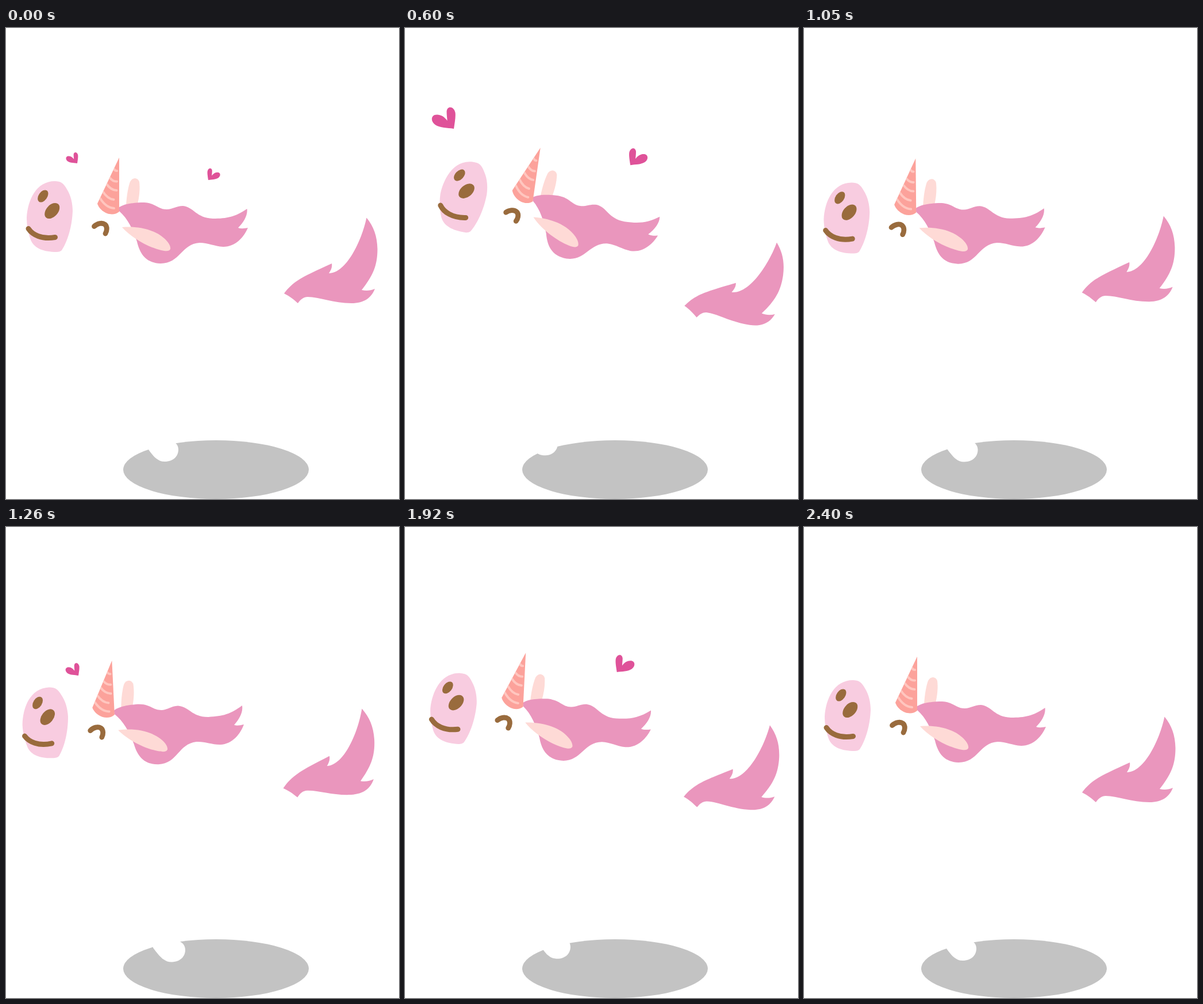
Animation of 684 by 818 pixels, one loop 2.73 s. Source, as an HTML page:

```html
<!DOCTYPE html>
<html lang="en">
<head>
<meta charset="utf-8">
<title>Rocking unicorn</title>
<style>
  html, body { margin: 0; width: 100%; height: 100%; overflow: hidden; background: #fff; }
  svg { display: block; width: 684px; height: 818px; }
  .mane { fill: #ea96bd; }
  .ear { fill: #fedad6; }
  .brown { fill: #996b3d; }
  .line { fill: none; stroke: #996b3d; stroke-linecap: round; stroke-linejoin: round; }
  .heart { fill: #df5299; }
</style>
</head>
<body>
<svg viewBox="0 0 684 818">
  <defs>
    <path id="horn" d="M197 225L197 319C191 324 183 324.500 176 322C168 319 161 312 159 305Z"/>
    <clipPath id="hornClip"><use href="#horn"/></clipPath>
  </defs>

  <ellipse cx="365.500" cy="767" rx="161.500" ry="51" fill="#c3c3c3"/>

  <g id="body">
    <path id="hoof" fill="#fff" d="M238 700L244.500 727C248 732 256 744 262 748C266 751 270 753 276 753C292 753 300 743 300 732C300 726 297 721 290 717L280 700Z"/>

    <path id="tail" class="mane" d="M484 461C501 438 519 431 567 409C568 415 566 420 562 426C592 426 619 370 627.500 329.500C640 345 646 361 646.500 384C646.500 412 639 430 619 455C627 457 635 456 642 453C636 468 624 478 601 478C570 478 545 467 525 467C518 467 513 471 508 478C500 471 494 466 484 461Z"/>

    <path class="ear" d="M209 308C210 290 213 275 216 267C220 259 229 259 232 267C233.500 280 232 292 229 306Z"/>
    <path class="mane" d="M196 312C203 307 213 304 235 303C260 302 263 315 280 315C290 315 296 309 308 309C327 311 331 330 360 331C385 331 399 328 419.500 314C421 325 414 337 404 347C409 349 415 348 421 347C414 363 400 380 378 380C362 379 352 373 337 373C305 375 303 409 269 409C243 408 233 392 228 371C221 350 212 331 197 318Z"/>
    <path class="ear" d="M202 346C228 344 257 349 275 365C283 372 287 379 286 384C284 388 279 388 270 386C245 380 217 363 202 346Z"/>

    <use href="#horn" fill="#fca29b"/>
    <path clip-path="url(#hornClip)" fill="none" stroke="#ffc6bf" stroke-width="4" stroke-linecap="round"
      d="M164 296Q174 312 188 313M168.500 284Q177 297 187.500 298M175 271Q183 282 192.500 282M180.500 260Q186 267 193 266.500M188 245Q190 248.500 193 248"/>

    <path fill="#f8cce0" d="M85 266C95 266 100 269 106 280C113 291 116 305 116 318C115 345 107 371 97 386Q94 389 88 389C66 389 49 383 43 368C38 354 36 342 36 329C38 298 53 266 85 266Z"/>
    <ellipse class="brown" rx="7.500" ry="11.800" transform="translate(64.300 292) rotate(35)"/>
    <ellipse class="brown" rx="10.200" ry="15.800" transform="translate(80.300 317.500) rotate(42)"/>
    <path class="line" stroke-width="9" d="M39 348.500C46 359 62 367.500 85.500 363.500"/>
    <path class="line" stroke-width="8.800" d="M153.500 344.500C159 339.500 167 337.500 172 341C177 345 175.500 353 173 357"/>
  </g>

  <g id="hearts"></g>
</svg>

<script>
const LOOP = 2730, END = 2400, STEP = 30, BEAT = 600;
const PIVOT = '335 488';
const ANGLES = [0, 8.15, -3.5, 3.55, 0];   // one key per beat

const HEART = 'M0 0C-1.5-10-3.500-21-2.500-28C-.5-39 11.500-41 12.500-30C12.500-23 11.500-18 11.500-14' +
  'C17.500-23 26.500-26 33.500-24C40.500-21 39.500-12 32.500-7C23.500-1 11.500-2 0 0Z';

// from / to: x and y of the tip, then scale
const hearts = [
  { show: 0,    start: 0,    flip: -1, from: [124, 235, .51],   to: [85, 175, 1] },
  { show: 0,    start: 300,  flip: 1,  from: [352, 264, .54],   to: [432.5, 212.4, 1.024] },
  { show: 1200, start: 1200, flip: -1, from: [130.5, 266, .55], to: [86, 186, .91] },
  { show: 1500, start: 1500, flip: 1,  from: [297, 287, .52],   to: [399.5, 237, .92] }
];

const body = document.getElementById('body');
const layer = document.getElementById('hearts');
const lerp = (a, b, p) => a + (b - a) * p;

for (const h of hearts) {
  h.el = document.createElementNS(layer.namespaceURI, 'path');
  h.el.setAttribute('d', HEART);
  h.el.setAttribute('class', 'heart');
  layer.append(h.el);
}

function draw(t) {
  const i = Math.min(Math.floor(t / BEAT), ANGLES.length - 2);
  const angle = lerp(ANGLES[i], ANGLES[i + 1], t / BEAT - i);
  body.setAttribute('transform', `rotate(${angle} ${PIVOT})`);

  for (const h of hearts) {
    const visible = t >= h.show && t <= h.start + BEAT;
    h.el.style.display = visible ? '' : 'none';
    const p = Math.min(Math.max((t - h.start) / BEAT, 0), 1);
    const [x, y, s] = h.from.map((v, k) => lerp(v, h.to[k], p));
    h.el.setAttribute('transform', `translate(${x} ${y}) scale(${s * h.flip} ${s})`);
  }
}

const origin = performance.now();
function tick() {
  const t = (performance.now() - origin) % LOOP;
  draw(Math.min(Math.floor(t / STEP) * STEP, END));
  requestAnimationFrame(tick);
}
tick();
</script>
</body>
</html>
```
